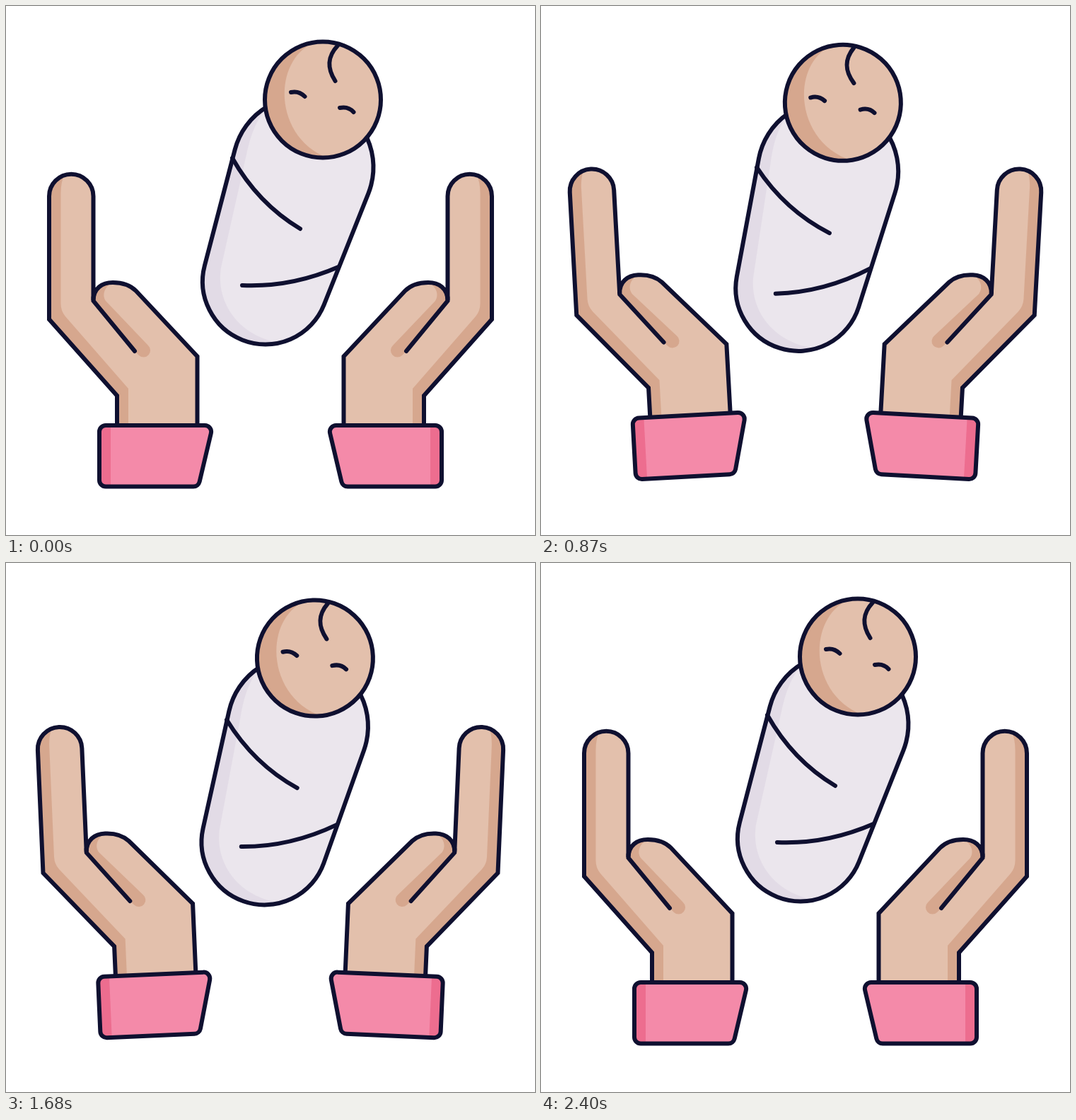
An HTML page with a canvas that plays this animation: 748 by 748 pixels, repeating every 2.43 s.

```html
<!DOCTYPE html>
<html lang="en">
<head>
<meta charset="utf-8">
<title>Caring hands</title>
<style>
html, body { margin: 0; width: 100%; height: 100%; overflow: hidden; background: #fff; }
canvas { display: block; width: 748px; height: 748px; }
</style>
</head>
<body>
<canvas id="stage" width="748" height="748"></canvas>
<script>
const SIZE = 748, LOOP = 2430, STEP = 30, HALF = 1200;
const INK = '#0f1030', SKIN = '#e3c0ac', SKIN_SHADE = '#d6a78e';
const CLOTH = '#ebe6ed', CLOTH_SHADE = '#e2dbe6', PINK = '#f48aa9', PINK_SHADE = '#ed6d8f';
const RAD = Math.PI / 180;
const ctx = document.getElementById('stage').getContext('2d');

const shape = d => new Path2D(d);

function fill(path, color) {
  ctx.fillStyle = color;
  ctx.fill(path);
}

function line(path) {
  ctx.strokeStyle = INK;
  ctx.stroke(path);
}

// Fills a shape with its shade, then lays the lit part over it.
function shaded(path, shade, lit, color) {
  ctx.save();
  ctx.clip(path);
  fill(path, shade);
  fill(lit, color);
  ctx.restore();
}

function roundedPolygon(points, radius) {
  const path = new Path2D();
  const [first, last] = [points[0], points[points.length - 1]];
  path.moveTo((first[0] + last[0]) / 2, (first[1] + last[1]) / 2);
  points.forEach((p, i) => {
    const next = points[(i + 1) % points.length];
    path.arcTo(p[0], p[1], next[0], next[1], radius);
  });
  path.closePath();
  return path;
}

// Outline of two circles joined by their outer tangents.
function capsule(x1, y1, r1, x2, y2, r2) {
  const axis = Math.atan2(y2 - y1, x2 - x1);
  const spread = Math.acos((r1 - r2) / Math.hypot(x2 - x1, y2 - y1));
  const path = new Path2D();
  path.arc(x1, y1, r1, axis + spread, axis - spread + 2 * Math.PI);
  path.arc(x2, y2, r2, axis - spread, axis + spread);
  path.closePath();
  return path;
}

// Cubic easing curve through (0,0) and (1,1) with flat ends.
function ease(u, x1, x2) {
  let low = 0, high = 1, s = u;
  for (let i = 0; i < 24; i++) {
    s = (low + high) / 2;
    const x = 3 * (1 - s) ** 2 * s * x1 + 3 * (1 - s) * s * s * x2 + s ** 3;
    if (x < u) low = s; else high = s;
  }
  return s * s * (3 - 2 * s);
}

function swing(t, returnIn) {
  return t <= HALF
    ? ease(t / HALF, 0.333, 0.667)
    : 1 - ease(Math.min(1, t / HALF - 1), 0.333, returnIn);
}

function turn(degrees, x, y) {
  ctx.translate(x, y);
  ctx.rotate(-degrees * RAD);
  ctx.translate(-x, -y);
}

const thumbTop = 'M125 416 C124 399 136 391 151 391 ';
const hand = {
  body: shape('M157 594 V551 L61 443 V269 A31.25 31.25 0 0 1 123.5 269 V416 ' +
    'C124 399 136 391 151 391 C166 391 177 396 184 403 L270.5 495.5 V594 Z'),
  lit: shape('M173 600 V541 L84 439 Q77.5 431 77.5 421 V264 Q77.5 248 84 234 H290 V600 Z'),
  thumbShade: shape(thumbTop + 'C140 396 135 408 141 417 L201 480 A9.5 9.5 0 0 1 188 494 L182 488 L123.5 417 Z'),
  crease: shape('M123.5 412 V417 L182 488'),
  cuff: roundedPolygon([[132, 593], [292.5, 593], [272, 679.5], [132, 679.5]], 9),
  cuffLit: shape('M148 585 H300 V690 H148 Z')
};

const baby = {
  body: capsule(420, 228, 99.5, 367, 389.5, 89),
  bodyLit: shape('M376 135 C351 162 345 188 340 210 L304 370 C296 420 330 468 390 477 V500 H540 V120 Z'),
  folds: shape('M320 215 Q356 279 416 315 M334 395 Q403 398 470 369'),
  head: shape('M366 132.5 a82 82 0 1 1 164 0 a82 82 0 1 1 -164 0 Z'),
  headLit: shape('M440 50 C376 72 376 185 455 215 H540 V50 Z'),
  face: shape('M469 56 C454 72 454 88 465.5 106 M403 122 Q414 119.5 422.5 128 M472 144 Q484 141.5 491.5 150')
};

function drawHand(angle) {
  ctx.save();
  turn(angle, -50, 636);
  shaded(hand.body, SKIN_SHADE, hand.lit, SKIN);
  fill(hand.thumbShade, SKIN_SHADE);
  line(hand.body);
  line(hand.crease);
  shaded(hand.cuff, PINK_SHADE, hand.cuffLit, PINK);
  line(hand.cuff);
  ctx.restore();
}

function drawBaby(angle) {
  ctx.save();
  turn(angle, 498, 432);
  shaded(baby.body, CLOTH_SHADE, baby.bodyLit, CLOTH);
  line(baby.body);
  line(baby.folds);
  shaded(baby.head, SKIN_SHADE, baby.headLit, SKIN);
  line(baby.head);
  line(baby.face);
  ctx.restore();
}

function draw(now) {
  const t = Math.floor((now % LOOP) / STEP) * STEP;
  const handAngle = 3.85 * swing(t, 0.667);
  ctx.fillStyle = '#fff';
  ctx.fillRect(0, 0, SIZE, SIZE);
  ctx.lineWidth = 6;
  ctx.lineCap = 'round';
  ctx.lineJoin = 'miter';
  drawBaby(5 * swing(t, 0.3));
  drawHand(handAngle);
  ctx.save();
  ctx.translate(SIZE, 0);
  ctx.scale(-1, 1);
  drawHand(handAngle);
  ctx.restore();
  requestAnimationFrame(draw);
}

requestAnimationFrame(draw);
</script>
</body>
</html>
```
